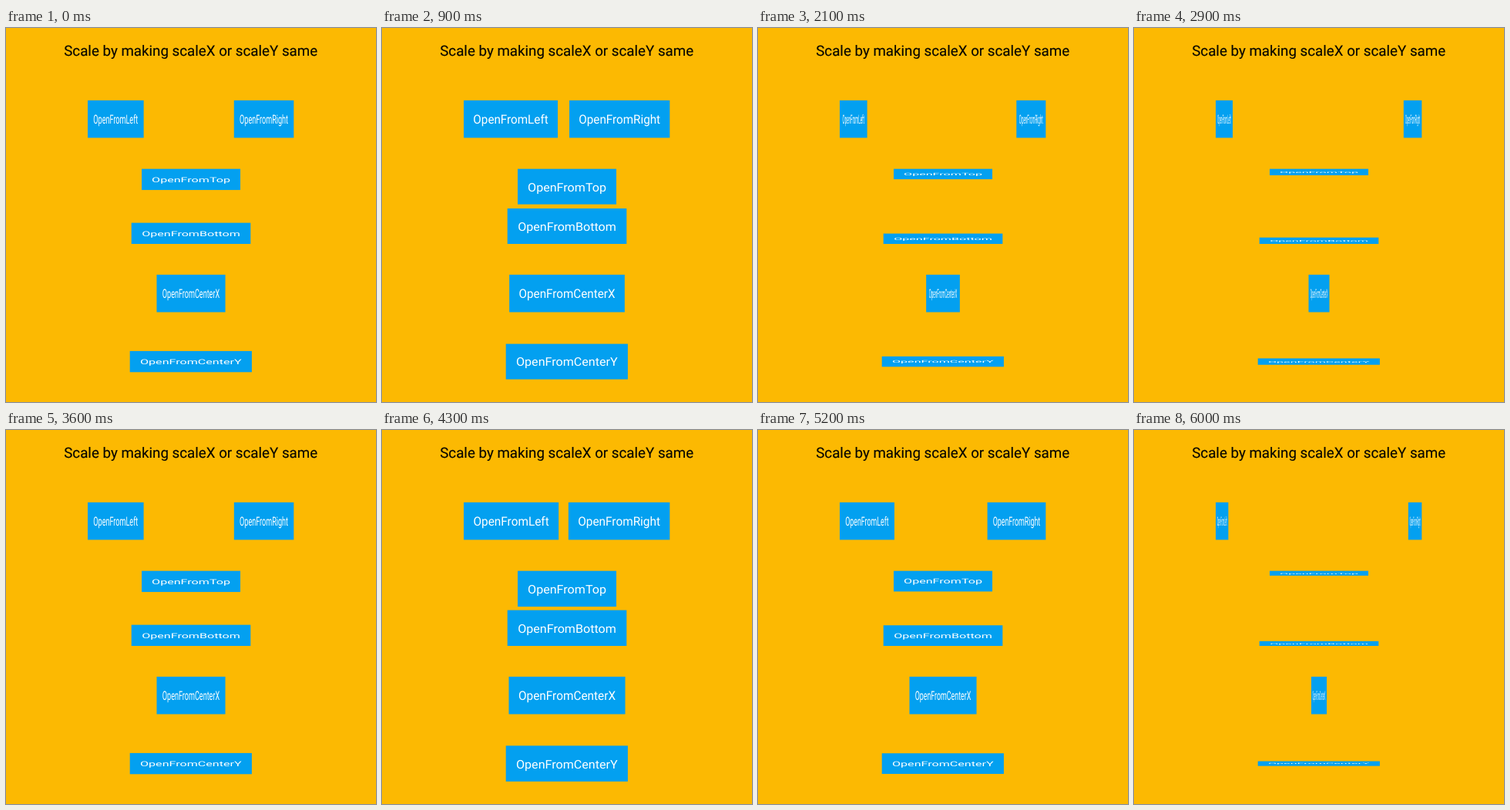
Recreate the animation shown at these times as an HTML page. Size 480 by 485 pixels, loop 6.1 s.

```html
<!DOCTYPE html>
<html lang="en">
<head>
<meta charset="utf-8">
<title>Scale demo</title>
<style>
  html, body { margin: 0; width: 100%; height: 100%; overflow: hidden; background: #fcb902; }
  svg { display: block; width: 480px; height: 485px; }
  text { font-family: Roboto, sans-serif; text-anchor: middle; text-rendering: geometricPrecision; }
  .title { font-size: 18.74px; fill: #0a0800; stroke: #0a0800; stroke-width: .15px; }
  rect { fill: #03a0f0; }
  .label { font-size: 16.1px; fill: #fff; }
</style>
</head>
<body>
<svg id="stage" viewBox="0 0 480 485">
  <text class="title" x="239.7" y="35.5">Scale by making scaleX or scaleY same</text>
</svg>
<script>
const LOOP = 6100, STEP = 100, HEIGHT = 48.6;

// Scale over time: linear between [ms, scale] points
const KEYS = [[0, .563], [803, 1], [2595, 0], [4381, 1], [5200, .55], [6000, .127]];

// x and y are the fixed point; ax and ay place it within the box (0 to 1)
const BOXES = [
  { name: 'OpenFromLeft',    axis: 'x', x: 106,   y: 93.8,  w: 129,   ax: 0,  ay: 0 },
  { name: 'OpenFromRight',   axis: 'x', x: 373.3, y: 93.8,  w: 137.7, ax: 1,  ay: 0 },
  { name: 'OpenFromTop',     axis: 'y', x: 240,   y: 182.7, w: 128,   ax: .5, ay: 0 },
  { name: 'OpenFromBottom',  axis: 'y', x: 240,   y: 280,   w: 154.6, ax: .5, ay: 1 },
  { name: 'OpenFromCenterX', axis: 'x', x: 240,   y: 319.9, w: 158.2, ax: .5, ay: 0 },
  { name: 'OpenFromCenterY', axis: 'y', x: 239.8, y: 432.6, w: 158.2, ax: .5, ay: .5 }
];

function add(parent, tag, attrs) {
  const node = document.createElementNS('http://www.w3.org/2000/svg', tag);
  for (const key in attrs) node.setAttribute(key, attrs[key]);
  return parent.appendChild(node);
}

const stage = document.getElementById('stage');
for (const box of BOXES) {
  const left = -box.w * box.ax, top = -HEIGHT * box.ay;
  box.group = add(stage, 'g', {});
  add(box.group, 'rect', { x: left, y: top, width: box.w, height: HEIGHT });
  add(box.group, 'text', { class: 'label', x: left + box.w / 2, y: top + HEIGHT / 2 + 6.2 })
    .textContent = box.name;
}

function scaleAt(t) {
  const i = KEYS.findIndex(key => key[0] >= t);
  if (i === 0) return KEYS[0][1];
  const [t0, s0] = KEYS[i - 1], [t1, s1] = KEYS[i];
  return s0 + (s1 - s0) * (t - t0) / (t1 - t0);
}

function draw(now) {
  const s = scaleAt(Math.floor(now % LOOP / STEP) * STEP);
  for (const { group, axis, x, y } of BOXES) {
    const scale = axis === 'x' ? `${s} 1` : `1 ${s}`;
    group.setAttribute('transform', `translate(${x} ${y}) scale(${scale})`);
  }
}

const start = performance.now();
function tick() {
  draw(performance.now() - start);
  requestAnimationFrame(tick);
}
tick();
</script>
</body>
</html>
```
